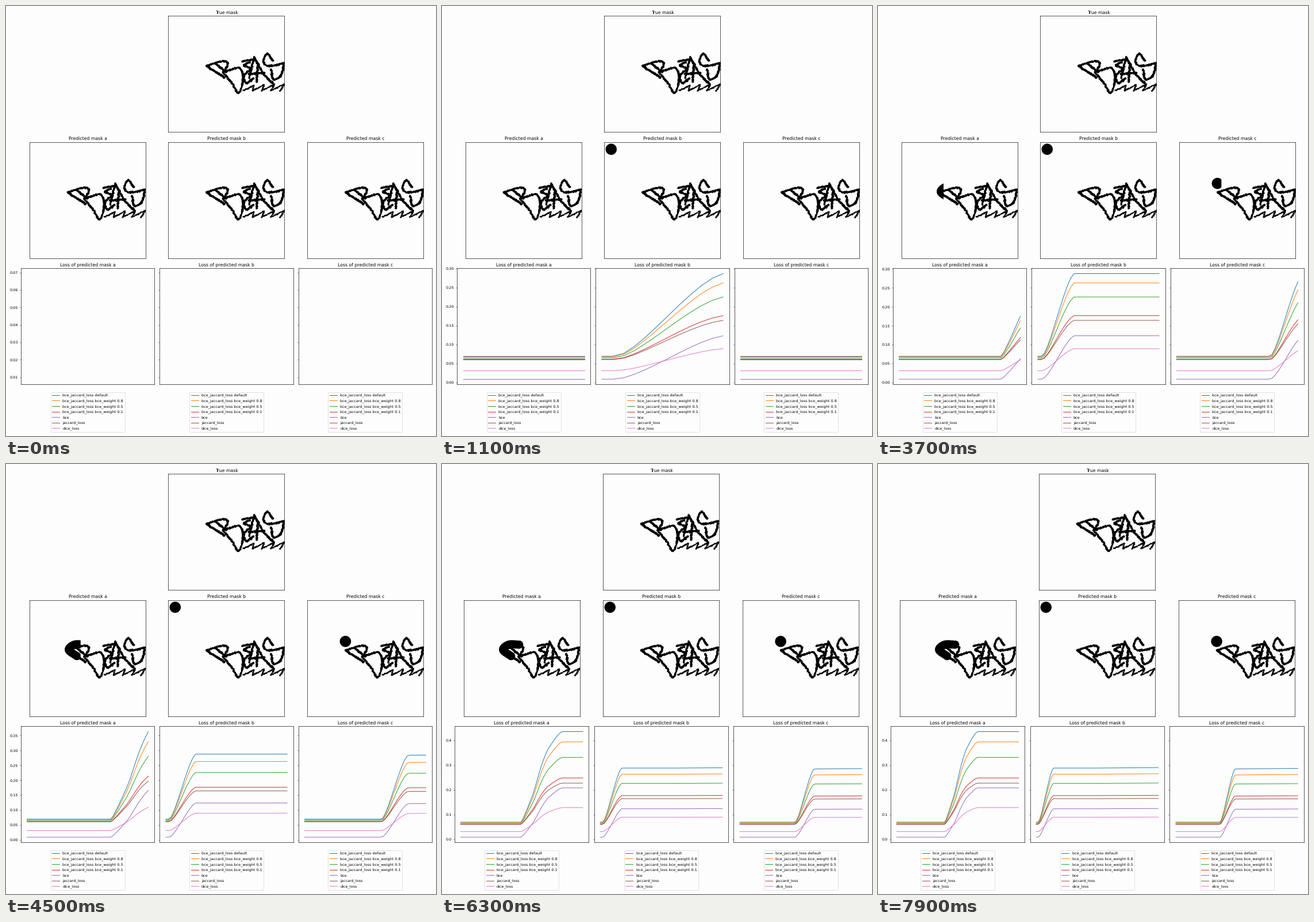
Recreate the animation shown at these times as a matplotlib script. Size 748x748 px, loop 8000 ms.

```python
import numpy as np
import matplotlib.pyplot as plt
from matplotlib.animation import FuncAnimation

SIZE, DPI, FRAMES = 748, 46.75, 80
PT = DPI / 72
N = 512                # mask resolution
STEP = 5               # mask columns revealed per frame
SIDE = 202             # panel height in pixels
TOPS = 17.3 + 219.5 * np.arange(3)
UNIT = N / SIDE
BG = "#fdfdfd"

plt.rcParams.update({
    "font.family": "DejaVu Sans", "text.hinting": "none",
    "axes.linewidth": 1.0, "axes.facecolor": BG, "figure.facecolor": BG,
    "legend.labelspacing": 0.57,
})

rng = np.random.default_rng(4)
Y, X = np.mgrid[:N, :N]


def disc(cx, cy, r):
    return (X - cx) ** 2 + (Y - cy) ** 2 <= r * r


def spline(points):
    """Catmull-Rom curve through the points, sampled every 3 units."""
    p = np.array(points, float) * UNIT
    p = np.vstack([2 * p[0] - p[1], p, 2 * p[-1] - p[-2]])
    for a, b, c, d in zip(p, p[1:], p[2:], p[3:]):
        for t in np.linspace(0, 1, int(np.hypot(*(c - b)) / 3) + 2):
            yield 0.5 * (2 * b + (c - a) * t + (2 * a - 5 * b + 4 * c - d) * t**2
                         + (3 * b - a - 3 * c + d) * t**3)


def brush(curve, r, rough=0.0):
    mask = np.zeros((N, N), bool)
    for x, y in curve:
        dx, dy, dr = rough * rng.normal(size=3)
        mask |= disc(x + dx, y + dy, r + 0.6 * dr)
    return mask


# Key points of each stroke, in panel pixels.
LETTERS = [
    # B
    [(67, 87), (92, 79), (103, 82), (97, 96)],
    [(82, 83), (97, 96)],
    [(67, 88), (97, 107)],
    [(95, 99), (111, 118), (121, 134), (129, 116), (124, 91), (98, 97)],
    # E
    [(147, 76), (128, 79)],
    [(141, 81), (131, 86), (142, 92), (131, 104), (135, 117), (147, 109)],
    # A
    [(149, 72), (140, 108)],
    [(149, 72), (166, 102), (181, 117)],
    [(139, 101), (167, 99)],
    [(155, 84), (153, 115)],
    # S
    [(181, 78), (171, 66), (165, 80), (175, 87), (202, 82)],
    [(200, 87), (194, 105), (182, 110), (178, 93)],
]
HOOK = [(96, 77), (78, 77), (68, 86), (82, 97)]

true = np.zeros((N, N), bool)
for stroke in LETTERS:
    true |= brush(spline(stroke), 4.7, 1.0)
for i in range(4):                      # zigzag underline
    low, high = (130 + 16 * i, 130), (148 + 18 * i, 121 - i)
    true |= brush(spline([low, high]), 3.2, 0.9)
    true |= brush(spline([high, (146 + 16 * i, 130)]), 3.2, 0.9)

extras = [brush(spline(HOOK), 18), disc(30.5, 30.5, 24.6), disc(167, 181, 24.6)]

# The losses follow the share of each added shape revealed so far.
steps = np.arange(FRAMES)


def revealed(shape):
    columns = np.r_[0, np.cumsum((shape & ~true).sum(axis=0))]
    return columns[STEP * steps] / columns[-1]


WEIGHTS = {"default": 1, "bce_weight 0.8": .8, "bce_weight 0.5": .5,
           "bce_weight 0.1": .1}


def losses(extra):
    bce = 0.0089 + extra
    jaccard = 1 - 0.9395 / (1 + 1.083 * extra)
    out = {f"bce_jaccard_loss {n}": jaccard + w * bce for n, w in WEIGHTS.items()}
    out.update(bce=bce, jaccard_loss=jaccard, dice_loss=jaccard / (2 - jaccard))
    return out


drift = 0.0011 * np.clip(steps / 39 - 1, 0, 1)
curves = [losses(0.199 * revealed(extras[0])),
          losses(0.1146 * revealed(extras[1]) + drift),
          losses(0.1127 * revealed(extras[2]) + drift)]
everything = np.array([list(c.values()) for c in curves])

fig = plt.figure(figsize=(SIZE / DPI, SIZE / DPI), dpi=DPI)


def shade(mask):
    return np.where(mask, 0.0, 0.992)


def image_panel(title):
    ax = fig.add_axes([0, 0, .1, .1], label=title)
    ax.set(xticks=[], yticks=[], title=title)
    return ax, ax.imshow(shade(true), cmap="gray", vmin=0, vmax=1, aspect="auto")


top_ax, _ = image_panel("True mask")
masks = [image_panel(f"Predicted mask {c}") for c in "abc"]

plots, lines = [], []
for i, c in enumerate("abc"):
    ax = fig.add_axes([0, 0, .1, .1], label=f"loss {c}",
                      sharey=plots[0] if plots else None)
    ax.set(xticks=[], title=f"Loss of predicted mask {c}")
    ax.tick_params(labelleft=i == 0)
    lines.append([ax.plot([], [], label=name)[0] for name in curves[i]])
    ax.legend(loc="upper center", bbox_to_anchor=(0.5, -0.05))
    plots.append(ax)


def place(ax, x, y, w):
    ax.set_position([x / SIZE, 1 - (y + SIDE) / SIZE, w / SIZE, SIDE / SIZE])


def arrange():
    """Fit the columns to the width of the tick labels."""
    axis = plots[0].yaxis
    label = axis.get_major_formatter().format_ticks(axis.get_majorticklocs())[-1]
    pad, tick = 10.8 * PT, 3.5 * PT
    left = pad + 2 * tick + 10 * PT * (0.636 * (len(label) - 1) + 0.318)
    width = (SIZE - pad - left - 2 * (pad + tick)) / 3
    for i in range(3):
        x = left + i * (width + pad + tick)
        square = x + (width - SIDE) / 2
        place(plots[i], x, TOPS[2], width)
        place(masks[i][0], square, TOPS[1], SIDE)
        if i == 1:
            place(top_ax, square, TOPS[0], SIDE)


def draw(n):
    seen = everything[:, :, :n + 1]
    lo, hi = seen.min(), seen.max()
    margin = 0.05 * (hi - lo)
    plots[0].set_ylim(lo - margin, hi + margin)
    for i, ax in enumerate(plots):
        masks[i][1].set_data(shade(true | (extras[i] & (X < STEP * n))))
        for line, values in zip(lines[i], seen[i]):
            line.set_data(steps[:n + 1], values)
        ax.set_xlim(-0.05 * max(n, 1), 1.05 * max(n, 1))
    arrange()
    return []


anim = FuncAnimation(fig, draw, frames=FRAMES, interval=100,
                     init_func=lambda: draw(0), repeat=True, repeat_delay=0)
plt.show()
```
